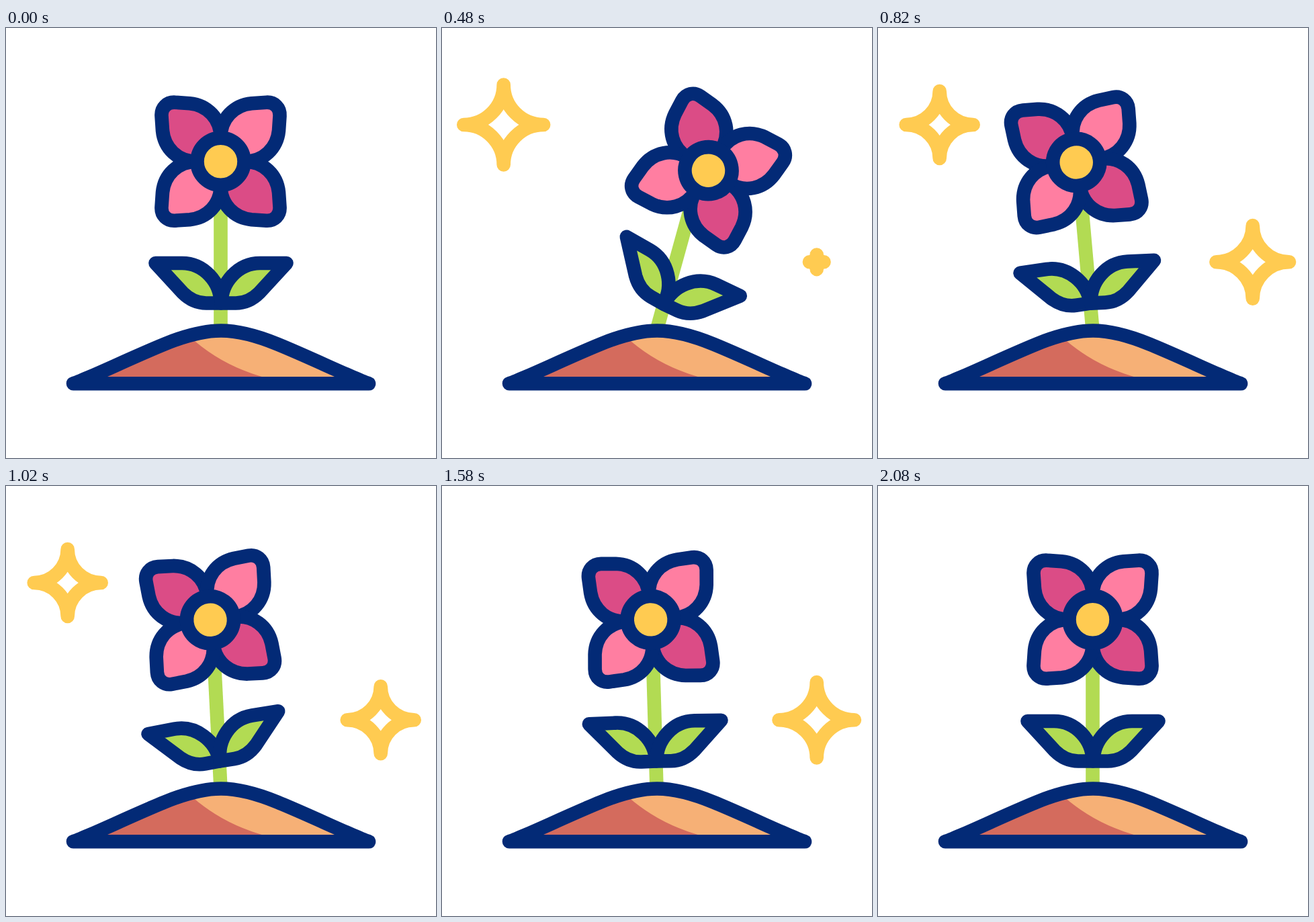
An HTML page that plays this animation: 640x640 px, repeating every 2.4 s.

```html
<!DOCTYPE html>
<html lang="en">
<head>
<meta charset="utf-8">
<title>Swaying flower</title>
<style>
  @property --stem { syntax: "<angle>"; inherits: true; initial-value: 0deg; }
  @property --head { syntax: "<angle>"; inherits: true; initial-value: 0deg; }
  @property --left { syntax: "<angle>"; inherits: true; initial-value: 0deg; }
  @property --right { syntax: "<angle>"; inherits: true; initial-value: 0deg; }
  @property --size { syntax: "<number>"; inherits: true; initial-value: 0; }

  html, body { margin: 0; width: 100%; height: 100%; overflow: hidden; background: #fff; }
  svg { display: block; width: 100%; height: 100%; }

  .line { stroke: #032a76; stroke-width: 20.6; stroke-linecap: round; stroke-linejoin: round; }
  .star { fill: none; stroke: #ffcb51; stroke-width: 20.6; stroke-linejoin: round;
          transform: scale(var(--size)); }
  #spark { vector-effect: non-scaling-stroke; }

  /* The parts share one stem but each sways with its own delay. */
  .plant, .star {
    animation-duration: 2400ms;
    animation-iteration-count: infinite;
    animation-timing-function: cubic-bezier(.333, 0, .667, 1);
  }
  .plant { animation-name: stem, head, left, right; }
  .stem { transform-origin: 319.5px 450px; transform: rotate(var(--stem)); }
  .head { transform-origin: 0 39px; transform: rotate(calc(var(--head) - var(--stem))); }
  .left, .right { transform-origin: 319.5px 406px; }
  .left { transform: rotate(calc(var(--left) - var(--stem))); }
  .right { transform: rotate(calc(var(--right) - var(--stem))); }
  .early { animation-name: early; }
  .late { animation-name: late; }

  @keyframes stem {
    0%, 86.667%, 100% { --stem: 0deg; }
    15.5% { --stem: 18.5deg; }
    35.833% { --stem: -5.5deg; }
    52.917% { --stem: 2.1deg; }
    69.167% { --stem: -2.1deg; }
  }
  @keyframes head {
    0%, 86.667%, 100% { --head: 0deg; }
    19.375% { --head: 31.8deg; }
    37.083% { --head: -11.2deg; }
    53.542% { --head: 5.4deg; }
    69.583% { --head: -5.5deg; }
  }
  @keyframes left {
    0%, 86.667%, 100% { --left: 0deg; }
    21.917% { --left: 30.4deg; }
    38.125% { --left: -14.9deg; }
    53.75% { --left: 6.7deg; }
    70% { --left: -4.3deg; }
  }
  @keyframes right {
    0%, 86.667%, 100% { --right: 0deg; }
    22.917% { --right: 26.4deg; }
    39.167% { --right: -10.9deg; }
    54.583% { --right: 3.9deg; }
    70.833% { --right: -2.1deg; }
  }
  @keyframes early {
    0%, 5.417%, 62.833%, 100% { --size: 0; }
    15.417%, 52.833% { --size: 1.34; }
    25.417%, 42.833% { --size: 1; }
  }
  @keyframes late {
    0%, 17.5%, 73.333%, 100% { --size: 0; }
    27.5%, 63.333% { --size: 1.34; }
    37.5%, 53.333% { --size: 1; }
  }
</style>
</head>
<body>
<svg viewBox="0 0 640 640">
  <defs>
    <path id="petal" d="M0 0V-36C0 -64 -20 -84 -46 -86.5L-68 -88C-80 -88.7 -88.7 -80 -88 -68L-86.5 -46C-84 -20 -64 0 -36 0Z"/>
    <path id="blade" d="M222.5 350H262C294 350 319.5 378 319.5 409.5H298C284 409.5 272 403 263 394Z"/>
    <path id="mound" d="M100 529.3C124 521 188 490 236 470.5C264 459 292 450.5 320 450.5S376 459 404 470.5C452 490 516 521 540 529.3Z"/>
    <path id="spark" d="M0 -50A50 50 0 0 0 50 0A50 50 0 0 0 0 50A50 50 0 0 0 -50 0A50 50 0 0 0 0 -50Z"/>
  </defs>

  <g class="plant">
    <g class="stem">
      <path d="M319.5 199V470" stroke="#b2db53" stroke-width="20.6"/>
      <g class="line" fill="#b2db53">
        <g class="left"><use href="#blade"/></g>
        <g class="right"><use href="#blade" transform="translate(640 0) scale(-1 1)"/></g>
      </g>
      <g transform="translate(319.5 198.7)">
        <g class="head line">
          <use href="#petal" fill="#db4c86"/>
          <use href="#petal" fill="#ff7ea1" transform="rotate(90)"/>
          <use href="#petal" fill="#db4c86" transform="rotate(180)"/>
          <use href="#petal" fill="#ff7ea1" transform="rotate(270)"/>
          <circle r="35" fill="#ffcb51"/>
        </g>
      </g>
    </g>
  </g>

  <use href="#mound" fill="#f6b076"/>
  <path d="M100 529.3C124 521 188 490 236 470.5L272 458C304 488 342 508 384 520V529.3Z" fill="#d46b5d"/>
  <use href="#mound" class="line" fill="none"/>

  <g transform="translate(91.7 144)"><use href="#spark" class="star early"/></g>
  <g transform="translate(557.7 348.3)"><use href="#spark" class="star late"/></g>
</svg>
</body>
</html>
```
